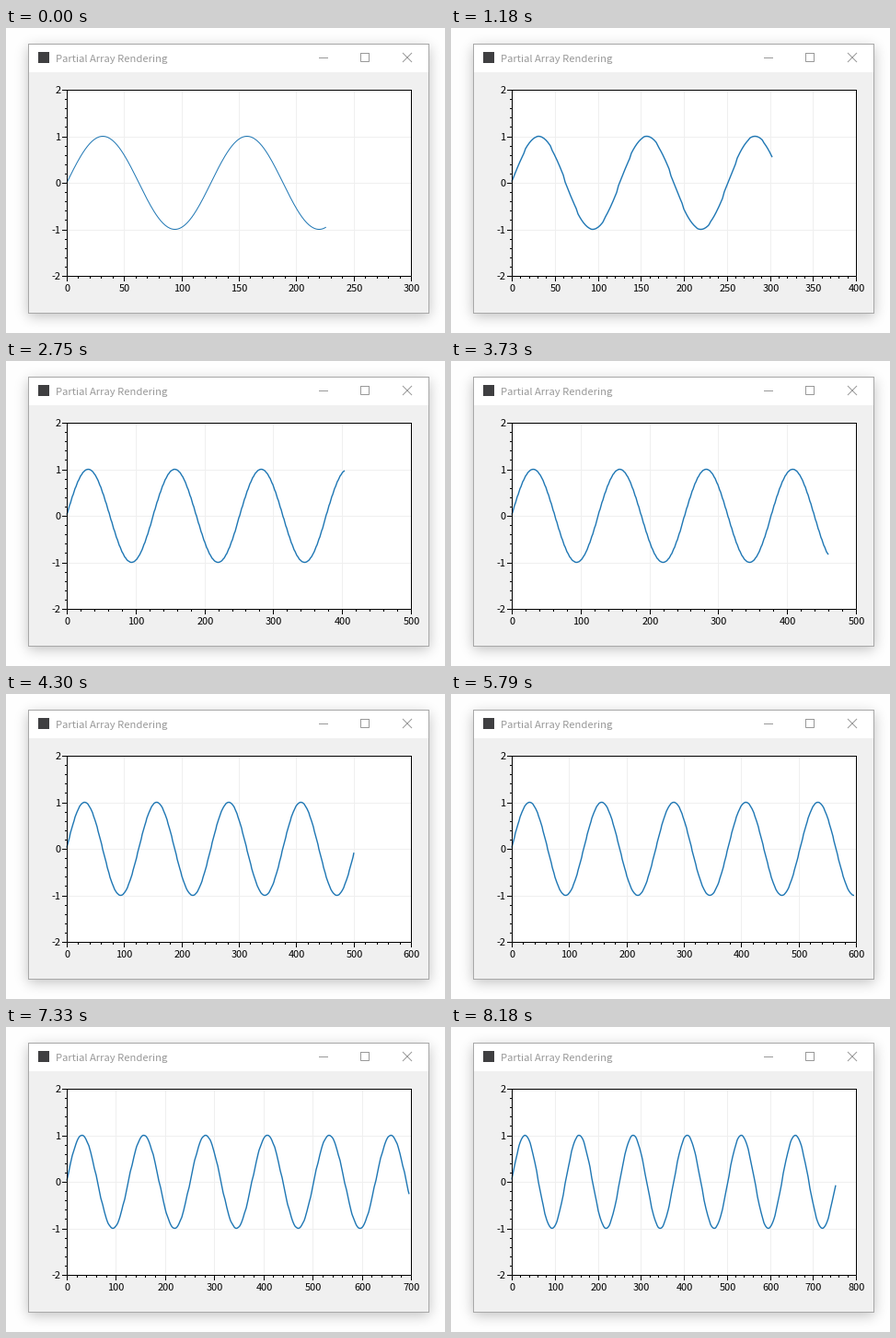
A matplotlib script for the animation above (8310 ms loop, 477x331 px).

```python
import math

import numpy as np
import matplotlib.pyplot as plt
from matplotlib.animation import FuncAnimation
from matplotlib.patches import Rectangle

W, H, DPI = 477, 331, 64
PX = 72 / DPI                      # points per pixel
LOOP, INTERVAL, REDRAW = 8310, 30, 107
FONT = "Noto Sans CJK JP"
GREY = "#999999"

LEFT, RIGHT, TOP, BOTTOM = 66, 440, 67, 269
SPAN = RIGHT - LEFT
UNIT = (BOTTOM - TOP) / 4
MID = (TOP + BOTTOM) / 2

# Samples shown at a few moments; the plot redraws in even steps between them
KEY_MS = [0, 1180, 2750, 4300, 5790, 7330, 8180]
KEY_N = [226, 303, 404, 502, 598, 697, 753]

fig = plt.figure(figsize=(W / DPI, H / DPI), dpi=DPI, facecolor="white")


def blurred_edge(size, lo, hi, sigma):
    s = sigma * math.sqrt(2)
    return np.array([(math.erf((p + 0.5 - lo) / s) - math.erf((p + 0.5 - hi) / s)) / 2
                     for p in range(size)])


def window_shadow():
    shade = np.outer(blurred_edge(H, 21, 313, 7), blurred_edge(W, 24, 460, 7))
    return np.repeat((1 - 0.25 * shade)[:, :, None], 3, axis=2)


fig.figimage(window_shadow(), origin="upper", zorder=-1)
ax = fig.add_axes([0, 0, 1, 1])
ax.set(xlim=(0, W), ylim=(H, 0))
ax.axis("off")


def pixel(v):
    return math.floor(v + 0.5)


def box(x, y, w, h, color, z=1):
    ax.add_patch(Rectangle((x, y), w, h, fc=color, ec="none", lw=0, zorder=z))


def stroke(x, y, color, z=3):
    return ax.plot(x, y, color=color, lw=PX, zorder=z, snap=False,
                   solid_capstyle="butt", solid_joinstyle="miter")[0]


def label(x, y, s, size=11, color="black", ha="center"):
    return ax.text(x, y, s, fontsize=size * PX, family=FONT, color=color,
                   ha=ha, va="baseline", zorder=5)


def segments(items):
    """Join (x0, y0, x1, y1) pieces into one broken line."""
    a = np.array(items, float)
    gap = np.full(len(a), np.nan)
    return (np.column_stack([a[:, 0], a[:, 2], gap]).ravel(),
            np.column_stack([a[:, 1], a[:, 3], gap]).ravel())


def outline(l, t, r, b, color, z=3):
    """One-pixel frame running through the given pixels."""
    l, t, r, b = l + 0.5, t + 0.5, r + 0.5, b + 0.5
    stroke([l, r, r, l, l, r], [t, t, b, b, t, t], color, z)


# Window
box(24, 17, 436, 293, "#a8a8a8")
box(25, 18, 434, 30, "white")
box(25, 48, 434, 261, "#f0f0f0")
box(35, 26, 12, 12, "#3f3f41")
label(54, 37, "Partial Array Rendering", 11.2, GREY, "left")
stroke([340, 350], [32.5, 32.5], GREY)
outline(385, 27, 394, 36, GREY)
stroke(*segments([(431, 27, 441, 37), (431, 37, 441, 27)]), GREY)

# Plot area and fixed vertical axis
box(LEFT, TOP, SPAN + 1, BOTTOM - TOP + 1, "white", 2)
outline(LEFT, TOP, RIGHT, BOTTOM, "black", 4.5)
y_grid, y_ticks = [], []
for i in range(21):
    row = pixel(TOP + i * UNIT / 5)
    y = row + 0.5
    y_ticks.append((LEFT - (2 if i % 5 else 5), y, LEFT, y))
    if i % 5 == 0:
        y_grid.append((LEFT, y, RIGHT, y))
        label(59.5, row + 4, str(2 - i // 5), ha="right")
stroke(*segments(y_grid), "#efefef", 2.5)
stroke(*segments(y_ticks), "black")

# Parts that follow the data
x_grid = stroke([], [], "#efefef", 2.5)
x_ticks = stroke([], [], "black")
x_labels = [label(0, 286, "") for _ in range(9)]
curve = stroke([], [], "#1f77b4", 4)


def wave(i):
    return MID - UNIT * np.sin(i / 20)


def draw_curve(n, xmax):
    dense = xmax > SPAN
    if dense:                      # one point per pixel column
        col = np.arange(math.ceil(n * SPAN / xmax))
        first = col * xmax // SPAN
        last = np.minimum((col + 1) * xmax // SPAN, n)
        curve.set_data(LEFT + col, wave((first + last) / 2))
    else:
        i = np.arange(n + 1)
        curve.set_data(LEFT + i * SPAN / xmax, wave(i))
    curve.set_linewidth((1.4 if dense else 1) * PX)


def draw_x_axis(xmax):
    major = 50 if xmax <= 400 else 100
    grid, ticks = [], []
    for lab in x_labels:
        lab.set_text("")
    for i in range(xmax // major * 5 + 1):
        x = pixel(LEFT + i * major / 5 / xmax * SPAN) + 0.5
        ticks.append((x, BOTTOM + 1, x, BOTTOM + (3 if i % 5 else 6)))
        if i % 5 == 0:
            grid.append((x, TOP, x, BOTTOM))
            x_labels[i // 5].set_text(str(i // 5 * major))
            x_labels[i // 5].set_x(x)
    x_grid.set_data(*segments(grid))
    x_ticks.set_data(*segments(ticks))


def samples_at(ms):
    k = np.searchsorted(KEY_MS, ms, side="right") - 1
    if k == len(KEY_MS) - 1:
        return KEY_N[-1]
    start, gap = KEY_MS[k], KEY_MS[k + 1] - KEY_MS[k]
    step = gap / round(gap / REDRAW)
    drawn = start + (ms - start) // step * step
    return int(np.interp(drawn, KEY_MS, KEY_N))


def update(frame):
    n = samples_at(frame * INTERVAL + INTERVAL - 10)
    xmax = math.ceil(n / 100) * 100
    draw_x_axis(xmax)
    draw_curve(n, xmax)
    return [x_grid, x_ticks, curve, *x_labels]


anim = FuncAnimation(fig, update, frames=LOOP // INTERVAL, interval=INTERVAL,
                     repeat=True, repeat_delay=0, blit=False)
plt.show()
```
